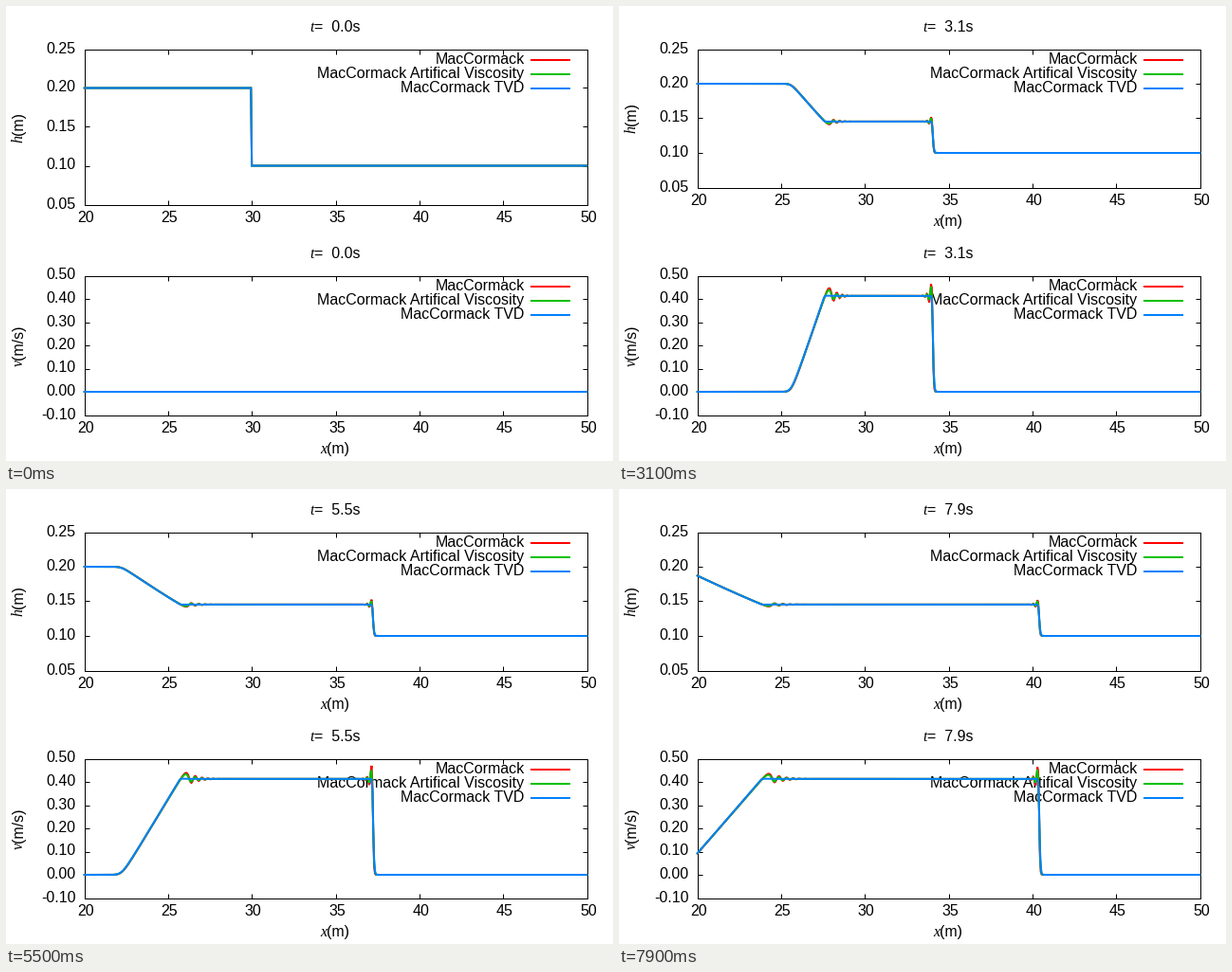
A matplotlib script that plays this animation: 640x480 px, repeating every 8 s.

```python
import numpy as np
import matplotlib.pyplot as plt
from matplotlib.animation import FuncAnimation

W, H, DPI = 640, 480, 80
PT = 72 / DPI                      # points per pixel
FRAMES, INTERVAL = 80, 100
LEFT, RIGHT = 82.5, 612.5
SCHEMES = [("MacCormack", "#ff0000"),
           ("MacCormack Artifical Viscosity", "#00c000"),
           ("MacCormack TVD", "#0080ff")]

# Dam break: shallow water equations for U = (depth, discharge)
G, DX, DT, STEPS = 9.81, 0.05, 0.02, 5
R = DT / DX
x = 10 + DX * np.arange(801)
shown = (x > 20 - 1e-6) & (x < 50 + 1e-6)


def flux(U):
    h, q = U
    return np.array([q, q * q / h + G * h * h / 2])


def maccormack(U):
    pred = U.copy()
    pred[:, :-1] -= R * np.diff(flux(U))
    new = U.copy()
    new[:, 1:-1] = ((U + pred)[:, 1:-1] - R * np.diff(flux(pred))[:, :-1]) / 2
    return new


def viscous(U):
    new = maccormack(U)
    h = new[0]
    sensor = np.zeros_like(h)
    sensor[1:-1] = (np.abs(h[2:] - 2 * h[1:-1] + h[:-2])
                    / (h[2:] + 2 * h[1:-1] + h[:-2]))
    eps = np.maximum(sensor[1:], sensor[:-1])
    new[:, 1:-1] += np.diff(eps * np.diff(new))
    return new


def tvd(U):
    d = np.diff(U)
    norm = (d * d).sum(0) + 1e-30
    dot = (d[:, 1:] * d[:, :-1]).sum(0)
    rp, rm = np.ones_like(norm), np.ones_like(norm)
    rp[1:] = dot / norm[1:]
    rm[:-1] = dot / norm[:-1]
    cfl = (np.abs(U[1] / U[0]) + np.sqrt(G * U[0])) * R
    c = np.where(cfl <= 0.5, cfl * (1 - cfl), 0.25)

    def limit(r):
        return 1 - np.clip(2 * r, 0, 1)

    k = (c[:-1] * limit(rp) + c[1:] * limit(rm)) / 2
    new = maccormack(U)
    new[:, 1:-1] += np.diff(k * d)
    return new


def solve(step):
    U = np.array([np.where(x < 30 - 1e-6, 0.2, 0.1), np.zeros_like(x)])
    out = []
    for _ in range(FRAMES):
        out.append((U[0, shown], U[1, shown] / U[0, shown]))
        for _ in range(STEPS):
            U = step(U)
    return out


runs = [solve(s) for s in (maccormack, viscous, tvd)]

fig = plt.figure(figsize=(W / DPI, H / DPI), dpi=DPI, facecolor="white")
ax = fig.add_axes([0, 0, 1, 1])
ax.set(xlim=(0, W), ylim=(H, 0))
ax.axis("off")


def px(v):
    return LEFT + (v - 20) / 30 * (RIGHT - LEFT)


class Panel:
    def __init__(self, top, bottom, ticks, names, field, xlabel=True):
        self.top, self.bottom, self.field = top, bottom, field
        self.lo, self.hi = ticks[0], ticks[-1]
        self.artists = []
        self.stroke([LEFT, RIGHT, RIGHT, LEFT, LEFT],
                    [top, top, bottom, bottom, top])
        for v in ticks:
            y = self.py(v)
            self.stroke([LEFT, LEFT + 5], [y, y])
            self.stroke([RIGHT - 5, RIGHT], [y, y])
            self.text(73.5, y + 4, f"{v:.2f}", ha="right")
        for v in range(20, 51, 5):
            p = px(v)
            self.stroke([p, p], [bottom, bottom - 5])
            self.stroke([p, p], [top, top + 5])
            self.text(p + 1.5, bottom + 18.5, str(v), ha="center")

        self.text(320.7, top - 18.5, "t", style="italic", family="Liberation Serif")
        self.clock = self.text(325.2, top - 18.5, "")
        if xlabel:
            self.text(331, bottom + 40.5, "x", style="italic", family="Liberation Serif")
            self.text(338.2, bottom + 40.5, "(m)")
        symbol, unit, width, total = names
        y = (top + bottom + total) / 2
        self.text(17.5, y, symbol, style="italic", family="Liberation Serif", rotation=90)
        self.text(17.5, y - width, unit, rotation=90)

        self.lines = []
        for i, (label, color) in enumerate(SCHEMES):
            y = top + 11.5 + 15 * i
            self.text(546.5, y + 4, label, ha="right")
            self.stroke([553, 595], [y, y], color, 2)
            line = self.stroke([], [], color, 2, zorder=3 + i, snap=False)
            line.set(solid_capstyle="round", solid_joinstyle="miter")
            self.lines.append(line)

    def py(self, v):
        return self.bottom - (v - self.lo) / (self.hi - self.lo) * (self.bottom - self.top)

    def stroke(self, xs, ys, color="black", lw=1, **kw):
        line, = ax.plot(xs, ys, color=color, lw=lw * PT, solid_capstyle="butt", **kw)
        self.artists.append(line)
        return line

    def text(self, tx, ty, s, ha="left", family="Liberation Sans", rotation=0, **kw):
        va = "baseline"
        if rotation:
            ha, va = "right", "bottom"
            kw.update(rotation_mode="anchor")
            ha, va = "left", "baseline"
        t = ax.text(tx, ty, s, ha=ha, va=va, family=family, rotation=rotation,
                    fontsize=16 * PT, zorder=1, **kw)
        self.artists.append(t)
        return t

    def show(self, i, on=True):
        for a in self.artists:
            a.set_visible(on)
        self.clock.set_text(f"=  {i / 10:.1f}s")
        for line, run in zip(self.lines, runs):
            line.set_data(px(x[shown]), self.py(run[i][self.field]))


depth = np.arange(1, 6) * 0.05
speed = np.arange(-1, 6) * 0.1
depth_names = ("h", "(m)", 8, 32)
first = Panel(45.5, 209.5, depth, depth_names, 0, xlabel=False)
upper = Panel(45.5, 191.5, depth, depth_names, 0)
lower = Panel(284.5, 431.5, speed, ("v", "(m/s)", 7.1, 43.5), 1)


def update(i):
    first.show(i, i == 0)
    upper.show(i, i > 0)
    lower.show(i)
    return []


anim = FuncAnimation(fig, update, frames=FRAMES, interval=INTERVAL,
                     repeat=True, repeat_delay=0, blit=False)
plt.show()
```
